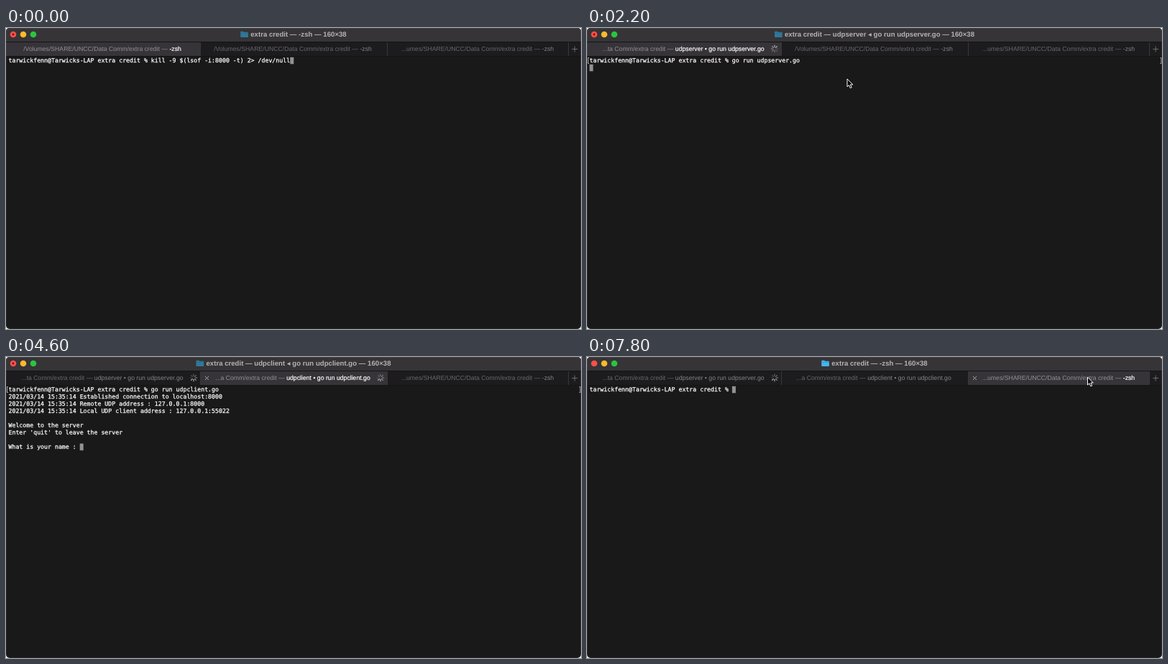
Animation, 800 px wide and 420 px high, one loop 8000 ms. Source, as an HTML page:

```html
<!DOCTYPE html>
<html lang="en">
<head>
<meta charset="utf-8">
<title>Terminal session</title>
<style>
  html, body { margin: 0; width: 100%; height: 100%; overflow: hidden; background: #fff; }
  svg { display: block; width: 100vw; height: 100vh; }
  text { white-space: pre; text-rendering: geometricPrecision; }
  .title { font: bold 9.65px "Liberation Sans", Arial, "DejaVu Sans", sans-serif; fill: #b4b3b5; }
  .tab text { font: 8.7px "Liberation Sans", Arial, "DejaVu Sans", sans-serif; fill: #69686a; text-anchor: middle; }
  .tab .cmd { fill: #858487; }
  .tab .bg { fill: #1c1b1d; }
  .tab.active .bg { fill: #363438; }
  .tab.active text { fill: #929194; }
  .tab.active .cmd { fill: #fff; stroke: #fff; stroke-width: .2px; }
  .screen text { font: 8.24px "DejaVu Sans Mono", monospace; fill: #fff; stroke: #fff; stroke-width: .25px; }
  .line { fill: none; stroke: #a9a8aa; stroke-width: 1; }
</style>
</head>
<body>
<svg viewBox="0 0 800 420" id="stage">
  <rect width="800" height="420" rx="5" fill="#1a191a"/>
  <path d="M0 19V5Q0 0 5 0H795Q800 0 800 5V19Z" fill="#363437"/>
  <circle cx="10" cy="9" r="4.3" fill="#fe5049"/>
  <circle cx="24" cy="9" r="4.3" fill="#fdb92c"/>
  <circle cx="38" cy="9" r="4.3" fill="#2ac53f"/>
  <circle id="busyDot" cx="10" cy="9" r="1.4" fill="#7a0a06"/>
  <g id="folder">
    <path d="M0 5.6q0-.9.9-.9h3l1.2 1.1h4.7q.9 0 .9.9v5.4q0 .9-.9.9H.9q-.9 0-.9-.9Z"/>
    <path d="M0 7.3H10.7" stroke="#1c5c80" stroke-opacity=".55" stroke-width=".6"/>
  </g>
  <text id="title" class="title" y="12.4"></text>
  <g id="tabs"></g>
  <rect x="783" y="19" width="17" height="20" fill="#1c1b1d"/>
  <path d="M787.2 29.5h8M791.2 25.5v8" fill="none" stroke="#747376" stroke-width=".9"/>
  <path d="M0 19.5H800M0 39.5H800" stroke="#141315" fill="none"/>
  <path d="M270.5 20V39M530.5 20V39M782.5 20V39" stroke="#39373a" fill="none"/>
  <g id="screen" class="screen"></g>
  <rect id="cursor" width="5" height="9.5" fill="#929194"/>
  <path id="marks" d="M3 41.5H1.5V49.5H3M797.5 41.5H799V49.5H797.5" class="line" stroke-width=".8"/>
  <rect x=".5" y=".5" width="799" height="419" rx="5" fill="none" stroke="#fff" stroke-opacity=".06"/>
  <path id="pointer" d="M0 0V11L2.5 8.7L4.3 12.8L6.2 12L4.4 8H7.8Z" fill="#000" stroke="#fff" stroke-width="1" stroke-linejoin="round"/>
</svg>
<script>
const STEP = 200, LOOP = 8000, CHAR = 4.96, ROW = 10, LEFT = 3.5;
const PROMPT = 'tarwickfenn@Tarwicks-LAP extra credit % ';
const PATH = '/Volumes/SHARE/UNCC/Data Comm/extra credit';
const KILL = 'kill -9 $(lsof -i:8000 -t) 2> /dev/null';
const SERVER = 'go run udpserver.go', CLIENT = 'go run udpclient.go';
const NAME = 'Tarwick';
const STAMP = '2021/03/14 15:35:14 ';
const WELCOME = [
  STAMP + 'Established connection to localhost:8000',
  STAMP + 'Remote UDP address : 127.0.0.1:8000',
  STAMP + 'Local UDP client address : 127.0.0.1:55022',
  '', 'Welcome to the server', "Enter 'quit' to leave the server", ''
];

// Time tables: [ms, value...], each entry holds until the next.
const serverTyping = [[200, 0], [400, 4], [600, 9], [800, 14], [1000, 19]];
const clientTyping = [[2800, 0], [3200, 2], [3400, 6], [3600, 11], [3800, 16], [4000, 19]];
const nameTyping = [[4600, 0], [5200, 1], [5400, 2], [5600, 3], [5800, 5], [6000, 6], [6200, 7]];
const pointerPath = [
  [0, null], [2200, [362, 71]], [2400, [353, 47]], [2600, [348, 30]], [2800, [347.5, 28.5]], [3200, null],
  [7000, [350, 28.5]], [7200, [432, 9]], [7400, [546, 2]], [7600, [662, 22]], [7800, [696.5, 28]]
];
const activeTab = [[0, 0], [2800, 1], [7800, 2]];
const hoverTab = [[0, -1], [2600, 1], [7200, -1], [7600, 2]];

const held = (table, t) => table.reduce((value, [at, next]) => t >= at ? next : value, table[0][1]);
const $ = id => document.getElementById(id);
const show = (node, on) => node.setAttribute('visibility', on ? 'visible' : 'hidden');

function add(parent, tag, attrs = {}) {
  const node = document.createElementNS('http://www.w3.org/2000/svg', tag);
  for (const key in attrs) node.setAttribute(key, attrs[key]);
  return parent.appendChild(node);
}

function makeTab([x, width, middle]) {
  const group = add($('tabs'), 'g', { class: 'tab' });
  add(group, 'rect', { class: 'bg', x, y: 19, width, height: 20 });
  const text = add(group, 'text', { x: middle, y: 32.4 });
  const path = add(text, 'tspan');
  const cmd = add(text, 'tspan', { class: 'cmd' });
  const close = add(group, 'path', { d: `M${x + 6} 27l5 5m0-5l-5 5`, class: 'line' });
  const spinner = add(group, 'g');
  const spokes = Array.from({ length: 8 }, (_, i) => add(spinner, 'path', {
    d: 'M0-2.3V-4.8', stroke: '#c4c3c5', 'stroke-width': 1.1, 'stroke-linecap': 'round',
    transform: `translate(${x + width - 9} 29) rotate(${i * 45})`
  }));
  return { group, path, cmd, close, spinner, spokes };
}

const tabs = [[0, 270, 134], [271, 259, 399], [531, 251, 656]].map(makeTab);
const rows = Array.from({ length: 10 }, (_, i) => add($('screen'), 'text', { x: LEFT, y: 48.4 + i * ROW }));

// Shell name of a process: starting with go run, then the built program.
function job(t, start, built, program) {
  if (t < start) return '-zsh';
  const run = `go run ${program}.go`;
  return t < built ? run : `${program} ◂ ${run}`;
}

function tabPath(name, tab) {
  if (name === '-zsh') return tab === 2 ? '...' + PATH.slice(4) : PATH;
  if (name.startsWith('go')) return '...' + PATH.slice(PATH.indexOf('E/UNCC'));
  return '...' + PATH.slice(PATH.indexOf(name.startsWith('udps') ? 'ta Comm' : 'a Comm'));
}

function screenLines(t, active) {
  if (active === 0) {
    if (t < 200) return [PROMPT + KILL];
    const line = PROMPT + SERVER.slice(0, held(serverTyping, t));
    return t < 1600 ? [line] : [line, ''];
  }
  if (active === 2) return [PROMPT];
  const line = PROMPT + CLIENT.slice(0, held(clientTyping, t));
  if (t < 4200) return [line];
  if (t < 4600) return [line, ''];
  const answer = 'What is your name : ' + NAME.slice(0, held(nameTyping, t));
  return [line, ...WELCOME, answer, ...(t < 6600 ? [] : [''])];
}

function draw(t) {
  const active = held(activeTab, t), hover = held(hoverTab, t);
  const names = [job(t, 1600, 1800, 'udpserver'), job(t, 4200, 4400, 'udpclient'), '-zsh'];
  const spinning = [t >= 2000, t >= 4400 && t < 6600, false];
  const running = names[active] !== '-zsh';
  const busy = running || t < 200;

  tabs.forEach((tab, i) => {
    tab.group.classList.toggle('active', i === active);
    tab.path.textContent = tabPath(names[i], i) + ' — ';
    tab.cmd.textContent = names[i].replace('◂', '•');
    show(tab.close, i === hover);
    show(tab.spinner, spinning[i]);
    const head = t / STEP * 3;
    tab.spokes.forEach((spoke, k) =>
      spoke.setAttribute('stroke-opacity', 1 - ((head - k) % 8 + 8) % 8 * 0.11));
  });

  const title = $('title');
  title.textContent = `extra credit — ${names[active]} — 160×38`;
  const left = 400 - (title.getComputedTextLength() + 14) / 2;
  title.setAttribute('x', left + 14);
  $('folder').setAttribute('transform', `translate(${left})`);
  $('folder').setAttribute('fill', busy ? '#307798' : '#43b7ea');
  show($('busyDot'), busy);
  show($('marks'), running);

  const lines = screenLines(t, active);
  rows.forEach((row, i) => row.textContent = lines[i] || '');
  $('cursor').setAttribute('x', LEFT + lines.at(-1).length * CHAR);
  $('cursor').setAttribute('y', 40.8 + (lines.length - 1) * ROW);

  const spot = held(pointerPath, t);
  show($('pointer'), spot);
  if (spot) $('pointer').setAttribute('transform', `translate(${spot})`);
}

let last = -1;
const start = performance.now();
function tick(now) {
  const step = Math.floor(Math.max(0, now - start) % LOOP / STEP);
  if (step !== last) draw((last = step) * STEP);
  requestAnimationFrame(tick);
}
draw(0);
requestAnimationFrame(tick);
</script>
</body>
</html>
```
